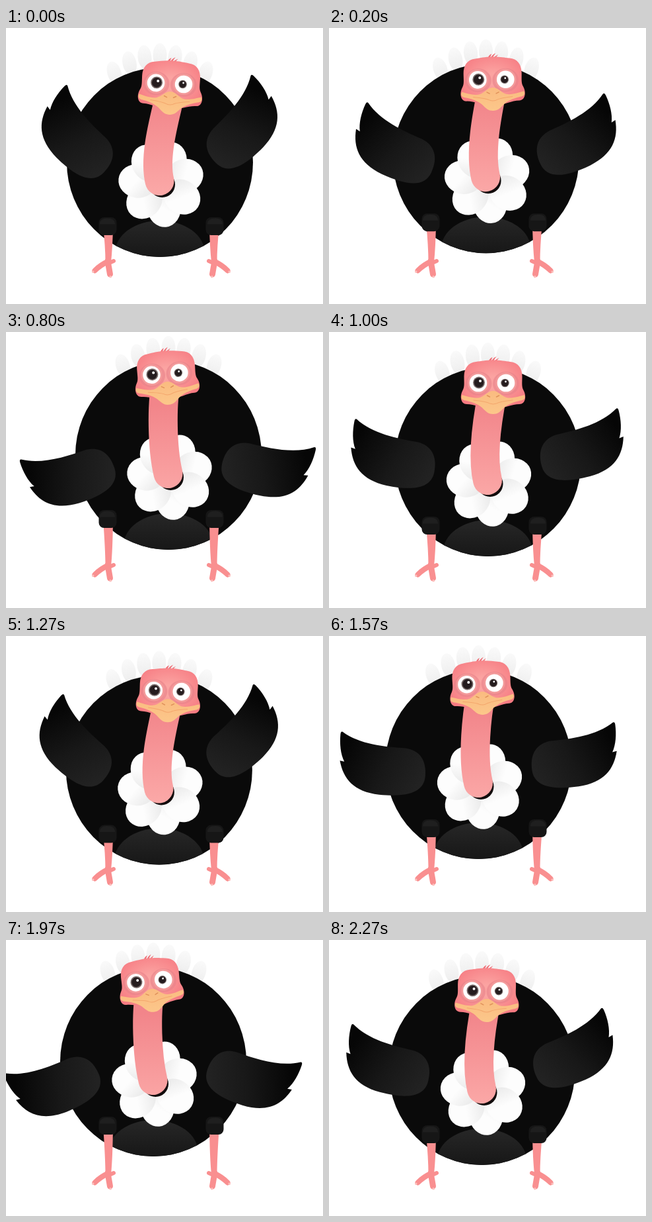
An HTML page that plays this animation: 480 by 417 pixels, repeating every 2.37 s.

```html
<!DOCTYPE html>
<html lang="en">
<head>
<meta charset="utf-8">
<title>Dancing ostrich</title>
<style>
html, body { margin: 0; width: 100%; height: 100%; overflow: hidden; background: #fff; }
svg { display: block; width: 480px; height: 417px; }
</style>
</head>
<body>
<svg viewBox="0 0 480 417">
  <defs>
    <linearGradient id="wingFill" gradientUnits="userSpaceOnUse" x1="-30" y1="14" x2="90" y2="-30">
      <stop stop-color="#222"/><stop offset=".45" stop-color="#181818"/><stop offset="1" stop-color="#060606"/>
    </linearGradient>
    <linearGradient id="plume" x2="0" y2="1">
      <stop stop-color="#fafafa"/><stop offset="1" stop-color="#ededed"/>
    </linearGradient>
    <linearGradient id="petalFill" x1="0" y1="0" x2=".8" y2=".5">
      <stop stop-color="#e4e4e4"/><stop offset=".75" stop-color="#fdfdfd"/>
    </linearGradient>
    <linearGradient id="bellyFill" x2="0" y2="1">
      <stop stop-color="#272727"/><stop offset=".6" stop-color="#161616"/>
    </linearGradient>
    <radialGradient id="skin" cy=".45" r=".6">
      <stop offset=".2" stop-color="#fba3a1"/><stop offset="1" stop-color="#f67a81"/>
    </radialGradient>
    <linearGradient id="neckFill" gradientUnits="userSpaceOnUse" x1="0" y1="110" x2="0" y2="250">
      <stop stop-color="#f2858a"/><stop offset="1" stop-color="#fba8a7"/>
    </linearGradient>
    <linearGradient id="beakFill" x2="0" y2="1">
      <stop stop-color="#fabb80"/><stop offset="1" stop-color="#fcc78a"/>
    </linearGradient>
    <clipPath id="bodyClip"><ellipse cy="-2" rx="141" ry="143"/></clipPath>
    <path id="wing" fill="url(#wingFill)" d="M-37 4C-37-22-24-36-2-37C30-36 70-36 98-53Q101-54 101-49C101-34 98-18 91-7L98-8C90 20 72 38 32 39C-10 39-37 30-37 4Z"/>
    <g id="foot" fill="none" stroke="#f98f90" stroke-linecap="round">
      <path stroke-width="6" d="M154 356L163 352"/>
      <path stroke-width="8" d="M154 353Q143 358 134.500 366.500"/>
      <path stroke-width="9" d="M154 352Q156 363 157.500 372"/>
      <path stroke="#fcc0bd" stroke-width="3" d="M132 368L131.500 368.500M158 375.500L158.500 376"/>
    </g>
    <g id="knee">
      <rect x="140.500" y="-13.500" width="27" height="27" rx="8" fill="#161616"/>
      <path d="M142-3Q142-12 153-12Q165-12 165-3Z" fill="#1f1f1f"/>
    </g>
  </defs>

  <g id="body">
    <g id="tail"></g>
    <ellipse cy="-2" rx="141" ry="143" fill="#0a0a0a"/>
    <ellipse cy="135" rx="68" ry="49" fill="url(#bellyFill)" clip-path="url(#bodyClip)"/>
  </g>

  <g id="left"><use href="#wing"/></g>
  <g id="right"><use href="#wing"/></g>

  <g id="leg">
    <path id="shank" fill="#f98f90"/>
    <use href="#foot"/>
    <use id="joint" href="#knee"/>
  </g>
  <use href="#leg" transform="translate(470) scale(-1 1)"/>

  <g id="flower">
    <g id="petals"></g>
    <circle cx="1" cy="1" r="19.500" fill="#120c0c"/>
  </g>
  <path id="neck" fill="none" stroke="url(#neckFill)" stroke-width="44" stroke-linecap="round"/>

  <g id="head">
    <path d="M-8 4Q-6-3-1-5Q-3-1-4 3Q0-4 5-6Q1-1 0 3Q4-2 9-4Q5 0 4 4Z" fill="#ef6f77"/>
    <path fill="url(#skin)" d="M0-.5C12-.5 18 1 26 2C38 3 44 12 44 24C44 34 43 40 46 45C51 54 49 66 40 66C28 66 18 72 0 74C-18 72-28 66-40 66C-49 66-51 54-46 45C-43 40-44 34-44 24C-44 12-38 3-26 2C-18 1-12-.5 0-.5Z"/>
    <g fill="#e8828a" opacity=".6">
      <ellipse cx="-22" cy="35" rx="20" ry="18"/>
      <ellipse cx="19.500" cy="35" rx="20" ry="18"/>
    </g>
    <g fill="#f39a9a">
      <circle cx="-22.500" cy="34" r="16"/><circle cx="19.500" cy="34" r="16"/>
    </g>
    <g fill="#fff">
      <circle cx="-22.500" cy="34" r="13.300"/><circle cx="19.500" cy="34" r="13.300"/>
    </g>
    <circle cx="-21.500" cy="33.500" r="9" fill="#776a69"/>
    <circle cx="-21.500" cy="33.500" r="7.300" fill="#251c1e"/>
    <circle cx="18" cy="34" r="6.300" fill="#776a69"/>
    <circle cx="18" cy="34" r="5.200" fill="#251c1e"/>
    <circle cx="-19.500" cy="31" r="2" fill="#fff"/>
    <circle cx="19" cy="32" r="1.400" fill="#fff"/>
    <path fill="url(#beakFill)" d="M-47 52C-40 54-28 58-20 56C-13 54-8 46 0 46C8 46 13 54 20 56C28 58 40 54 47 52Q50 58 44 60C34 62 24 65 17 71C10 78 7 81 0 81C-7 81-10 78-17 71C-24 65-34 62-44 60Q-50 58-47 52Z"/>
    <path fill="none" stroke="#f3a66c" d="M-30 60Q-10 62-5 65Q0 67 5 65Q10 62 30 60"/>
    <path fill="none" stroke="#df915a" stroke-width="1.500" stroke-linecap="round" d="M-9 53L-5 55M9 53L5 55"/>
  </g>
</svg>
<script>
const LOOP = 2370, STEPS = 24;

// step, body x, y, head x, y, tilt, left wing angle, right wing angle, wing y
const KEYS = [
  [0, 233, 205, 249.5, 50, 3, 72, 73, -14.5],
  [4, 242, 192, 244, 36, -5, 26, 28, 18],
  [6.7, 246, 186, 242, 27, -6, 6, 10, 26],
  [8, 246, 188, 243, 29, -4.5, 10, 15, 25],
  [10, 240.5, 198, 248.5, 43, 0, 39, 42, 3],
  [12.5, 233, 205, 248, 50, 3, 72, 73, -14.5],
  [16, 226.5, 196, 231, 38, -3, 33, 35, 9],
  [18.8, 223, 185, 219, 27, -6, 4, 8, 28],
  [20, 223, 186, 219, 28, -6, 5.3, 9.6, 27],
  [23, 231.5, 199, 239, 43, 0.5, 42, 51, 2]
];

const $ = id => document.getElementById(id);
const set = (id, name, value) => $(id).setAttribute(name, value);
const move = (id, x, y, rest = '') => set(id, 'transform', `translate(${x} ${y}) ${rest}`);

for (const k of [-3, 3, -2, 2, -1, 1, 0])
  $('tail').innerHTML += `<ellipse rx="10.5" ry="18" fill="url(#plume)" transform="translate(${23 * k} ${3 * k * k - 164}) rotate(${6 * k})"/>`;
for (let k = 0; k < 7; k++)
  $('petals').innerHTML += `<ellipse cx="36.5" rx="29" ry="25.5" fill="url(#petalFill)" transform="rotate(${84 + k * 360 / 7})"/>`;

function key(i) {
  const turn = Math.floor(i / KEYS.length);
  const [step, ...values] = KEYS[i - turn * KEYS.length];
  return [step + turn * STEPS, ...values];
}

// Smooth curve through the key poses, wrapping around the loop
function poseAt(n) {
  let i = 0;
  while (key(i + 1)[0] <= n) i++;
  const [a, b, c, d] = [i - 1, i, i + 1, i + 2].map(key);
  const span = c[0] - b[0], t = (n - b[0]) / span;
  return b.slice(1).map((v, j) => {
    const q = j + 1;
    const m0 = (c[q] - a[q]) / (c[0] - a[0]) * span;
    const m1 = (d[q] - b[q]) / (d[0] - b[0]) * span;
    const diff = c[q] - v;
    return v + t * (m0 + t * (3 * diff - 2 * m0 - m1 + t * (m0 + m1 - 2 * diff)));
  });
}

// A raised wing slides toward the body
const reach = angle => 117 - 9 * (angle / 72) ** 3;
const turnWing = angle => `rotate(${27.5 - angle}) scale(.97)`;

function draw(n) {
  const [x, y, hx, hy, tilt, left, right, wy] = poseAt(n);
  const kneeY = y + 94.5;
  move('body', x, y);
  move('left', x - reach(left), y + wy, 'scale(-1 1) ' + turnWing(left));
  move('right', x + reach(right), y + wy - 8 - right * .09, turnWing(right));
  move('joint', 0, kneeY);
  set('shank', 'd', `M147 ${kneeY}H162Q161.5 330 159 354H150.5Q150.5 330 147 ${kneeY}`);
  move('flower', x + 2.5, y + 30.5);
  set('neck', 'd', `M${hx - 1} ${hy + 50}C${hx - 7} ${hy + 80} ${x - 10} ${y - 14} ${x - .5} ${y + 26}`);
  move('head', hx, hy, `rotate(${tilt} 0 35)`);
}

// Ten poses a second; the step at 1000 ms is 30 ms shorter
function tick() {
  const t = performance.now() % LOOP;
  draw(Math.floor((t < 1070 ? t : t + 30) / 100));
  requestAnimationFrame(tick);
}
tick();
</script>
</body>
</html>
```
